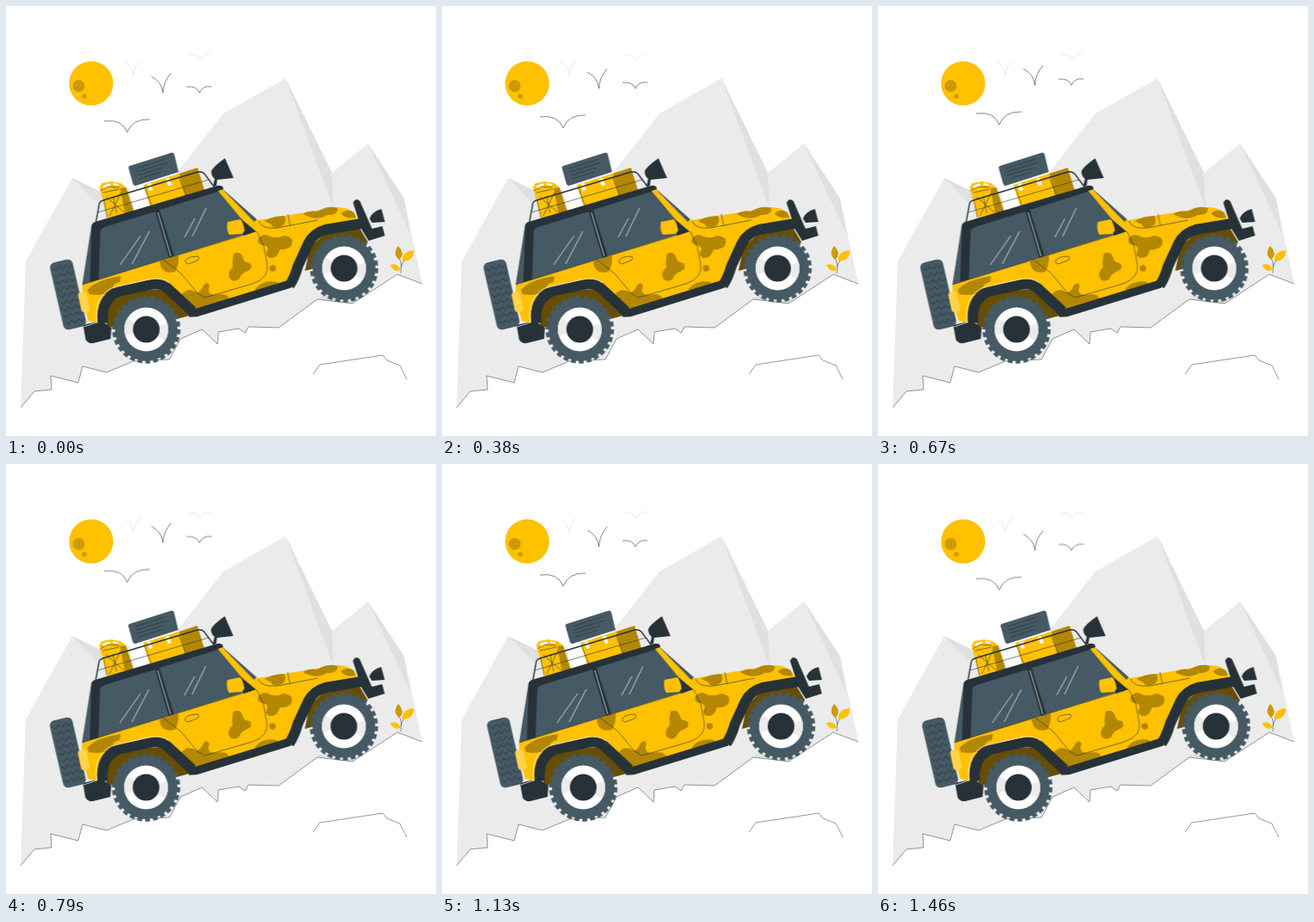
Animation of 500 by 500 pixels, one loop 1500 ms. Source, as an HTML page without scripts:

```html
<!DOCTYPE html>
<html lang="en">
<head>
<meta charset="utf-8">
<title>Off-road climb</title>
<style>
html, body { margin: 0; width: 100%; height: 100%; overflow: hidden; background: #fff; }
svg { display: block; width: 100%; height: 100%; }
.car { animation: shake 1.5s ease infinite; }
.birds { animation: float 1.5s linear infinite; }
@keyframes shake {
  10%, 90% { transform: translateX(-1px); }
  20%, 80% { transform: translateX(2px); }
  30%, 50%, 70% { transform: translateX(-4px); }
  40%, 60% { transform: translateX(4px); }
}
@keyframes float { 50% { transform: translateY(-10px); } }
.yellow { fill: #ffc100; }
.amber { fill: #cc9a00; }
.camo { fill: #b38700; }
.brown { fill: #664d00; }
.dark { fill: #263238; }
.slate { fill: #455a64; }
.line { fill: none; stroke: #263238; stroke-width: .6; stroke-linejoin: round; }
.hair { stroke-width: .5; }
.rail { stroke-width: 1.4; }
.arch { stroke-width: 12; }
.sill { stroke-width: 9.5; }
.glint { fill: none; stroke: #fff; stroke-width: .7; }
</style>
</head>
<body>
<svg viewBox="0 0 500 500">
  <defs>
    <g id="wheel">
      <circle class="slate" r="36.5"/>
      <circle r="37.5" fill="none" stroke="#455a64" stroke-width="4.500" pathLength="26" stroke-dasharray=".62 .38"/>
      <circle r="25.5" fill="#fff"/>
      <path d="M-24.5 7A25.5 25.5 0 0 1-22-13L0 0Z M24.5-7A25.5 25.5 0 0 1 22 13L0 0Z" fill="#ebebeb"/>
      <circle class="dark" r="15.5"/>
    </g>
    <path id="tread" class="line" d="M-11-2l4 4 4-4 4 4 4-4 4 4 3-3"/>
  </defs>

  <!-- Landscape -->
  <path fill="#ebebeb" d="M17 467L23 297 77 200 112 217 190 205 253 125 325 84 379 194 421 160 463 224 484 323 455 312 403 346 362 341 317 374 282 373 278 380 271 375 247 379 246 393 228 376 203 387 190 411 148 413 117 426 89 419 84 438 52 430 53 446 33 448Z"/>
  <path fill="#e0e0e0" d="M77 200L112 217 112 229 103 227ZM325 84L379 194 381 236ZM421 160L463 224 470 265ZM322 362L362 341 403 346 420 330 375 333Z"/>
  <path class="line hair" d="M17 467L33 448 53 446 52 430 84 438 89 419 117 426 148 413 190 411 203 387 228 376 246 393 247 379 271 375 278 380 282 373 317 374 362 341 403 346 455 312 484 323M357 428L365 417 438 406 443 412 458 418 466 434"/>
  <circle class="yellow" cx="99" cy="90" r="25.700"/>
  <circle class="amber" cx="84.500" cy="93" r="7"/>
  <circle class="amber" cx="91" cy="105" r="2.800"/>
  <path class="line hair" d="M459 311Q461 300 457 293M459 304Q461 297 465 294"/>
  <path class="amber" d="M456 279Q465 288 457 295Q449 288 456 279Z"/>
  <path class="yellow" d="M474 284Q475 296 461 297Q460 285 474 284ZM447 301Q456 298 459 307Q450 310 447 301Z"/>

  <!-- Birds -->
  <path fill="none" stroke="#e0e0e0" stroke-width=".7" d="M138 64Q147 70 148 80Q149 69 157 62M213 57Q223 56 226 63Q230 55 239 56"/>
  <path class="line birds" d="M114 134Q135 131 141 147Q147 131 167 132M169 82Q181 88 182.500 101Q183 88 192 78M210 94Q222 93 225 101Q229 92 239 94"/>

  <g transform="translate(.7 0)"><g class="car">
    <!-- Luggage -->
    <path class="yellow" d="M108 211L111 206 122 204 133 206 139 211 148 239 118 248Z"/>
    <path class="camo" d="M132 212L139 211 148 239 138 242Z"/>
    <path fill="#fff" d="M112 209L120 206 121 209 113 212ZM124 206L130 207 130 209 124 208Z"/>
    <path class="line" d="M109 215L118 210 131 211M112 217L131 213M116 222L137 240M133 217L120 244M124 221L128 241"/>
    <path fill="#fff" d="M143 213L160 208 167 233 149 238Z"/>
    <path class="yellow" d="M159 208L222 188 230 214 167 233Z"/>
    <path class="camo" d="M201 195L222 188 230 214 208 221Z"/>
    <path fill="#fff" d="M164 207L168 206 170 214 166 215ZM185 201L189 200 192 208 188 209Z"/>
    <path class="slate" d="M143 186L192 170.500Q194 170 195 172L200 193 150 209Q148 209 147 207L142 189Q141 187 143 186Z"/>
    <path class="line" d="M150 189L185 178M151 193L187 182M152 197L182 188M154 201L180 193"/>
    <path class="line rail" d="M104 251L108 229Q109 227 112 226L222 193Q227 192 230 195L242 211"/>
    <path class="line" d="M106 240L235 202M113 226L117 246M161 212L169 233M201 200L209 221"/>
    <path class="dark" d="M238 192Q240 187 254 177L264 200 245 202 244 209 240 210 242 201Q238 198 238 192Z"/>

    <!-- Wheel wells and spare wheel -->
    <path class="brown" d="M116 374L118 346 135 333 180 329 217 359 190 366ZM347 308L353 280 372 263 411 259 420 274 414 290Z"/>
    <path class="dark" d="M89 371L110 366 122 374 121 387 101 392Q95 393 92 388Z"/>
    <g transform="translate(71.500 335.500) rotate(-13)">
      <rect class="slate" x="-13.500" y="-40" width="27" height="80" rx="6"/>
      <use href="#tread" y="-32"/><use href="#tread" y="-24"/><use href="#tread" y="-16"/>
      <use href="#tread" y="-8"/><use href="#tread"/><use href="#tread" y="8"/>
      <use href="#tread" y="16"/><use href="#tread" y="24"/><use href="#tread" y="32"/>
    </g>

    <!-- Body -->
    <path class="yellow" d="M88 324L100 254 247 211 292 249 384 234Q400 234 406 243L411 256 372 260 352 275 340 305 325 324 220 356 186 326 165 322 128 332 112 345 108 369 95 366 88 340Z"/>
    <g class="camo">
      <path d="M94 330Q105 318 133 314L132 321Q120 324 126 331Q112 338 96 335Z"/>
      <path d="M178 297L200 290Q201 300 196 309Q180 313 178 297Z"/>
      <path d="M203 336Q210 327 219 332Q224 336 229 325Q234 319 236 326Q232 335 242 336Q258 333 259 341L221 355Z"/>
      <path d="M264 288Q272 284 275 293Q275 298 283 299Q288 306 278 309Q272 312 271 317Q264 323 259 316Q257 309 263 304Q262 297 264 288Z"/>
      <path d="M293 270Q300 263 306 268Q315 271 322 267Q336 268 331 279Q326 284 318 283Q315 294 306 293Q299 290 304 283Q303 278 297 278Q291 276 293 270Z"/>
      <circle cx="309.500" cy="305" r="3.700"/>
      <path d="M289 329Q298 318 315 321L314 328 291 335Z"/>
      <path d="M300 250Q310 244 323 244Q327 252 320 256Q310 260 308 254Z"/>
      <path d="M345 242Q351 237 361 239Q375 231 385 235Q386 243 373 243Q360 251 345 242Z"/>
      <path d="M389 241Q396 235 404 240L406 246Q393 248 389 241Z"/>
    </g>
    <path class="slate" d="M88 324L99 254 248 213 288 262Z"/>
    <path class="dark" d="M97 321L99 257Q99 252 103 251L245 209Q253 208 252 214L178 237 195 291 189 293 173 239 114 257Q109 259 109 263L107 318Z"/>
    <path class="yellow" d="M246 215L252 213 292 259 286 263Z"/>
    <path class="slate" d="M251 213L255 216 291 248 288 251Z"/>
    <path class="dark" d="M272 247L290 262 276 267Z"/>
    <path class="yellow" d="M257 251L272 248Q275 251 277 261L274 265 259 266Q255 260 257 251Z"/>
    <path class="line" d="M88 324L195 291 290 262M181 294L203 311 222 334 231 339 286 323Q306 316 303 300L299 279 291 262M293 250Q297 260 315 258L362 249M327 242L330 256"/>
    <path class="line" d="M208 296Q211 291 223 291Q225 294 222 296L211 300Q207 299 208 296Z"/>
    <path class="glint" d="M132 301L156 267M146 300L166 262M207 269L219 247M216 268L232 235M176 240L191 291"/>
    <rect x="85" y="332" width="10" height="24" rx="4" transform="rotate(-12 90 344)" fill="#ffd34d"/>

    <!-- Fenders, sill and bumper -->
    <path class="line arch" d="M112 369Q109 341 130 332L168 324Q180 321 188 329L216 355M329 325Q335 316 339 302L351 276Q357 264 371 260L413 253"/>
    <path class="line sill" d="M212 357L221 356.500 330 323"/>
    <path class="glint" d="M90 373L105 368Q101 339 122 328L165 318Q181 315 189 322"/>
    <path class="dark" d="M403 229Q406 222 411 227L425 259 437 256 440 267 421 273 413 260Z"/>
    <path class="dark" d="M422 247Q425 239 436 236L440 251 425 252Z"/>
    <use href="#wheel" x="162.500" y="376"/>
    <use href="#wheel" x="392.500" y="305"/>
  </g></g>
</svg>
</body>
</html>
```
